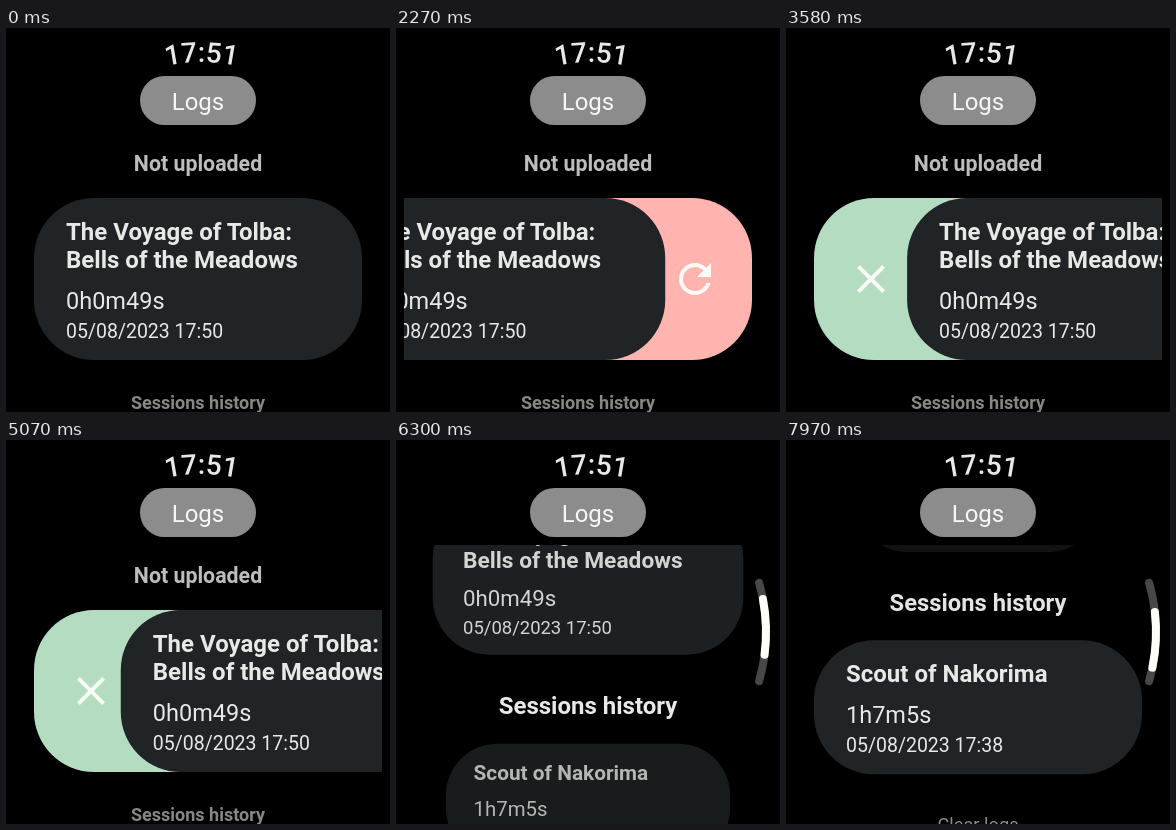
An HTML page that plays this animation: 384 by 384 pixels, repeating every 8 s.

```html
<!DOCTYPE html>
<html lang="en">
<head>
<meta charset="utf-8">
<title>Watch logs</title>
<style>
  html, body { margin: 0; width: 100%; height: 100%; overflow: hidden; background: #000; }
  svg { display: block; width: 100vw; height: 100vh; }
  text { font-family: Roboto, sans-serif; font-size: 24px; fill: #e8e8e6; }
  .bold { font-weight: 700; }
  .mid { text-anchor: middle; }
  .length { font-size: 23.5px; }
  .date { font-size: 19.5px; }
  .card { fill: #202426; }
  .icon { fill: #fafaf6; }
  .bar { fill: none; stroke-width: 8; stroke-linecap: round; }
</style>
</head>
<body>
<svg viewBox="0 0 384 384">
  <defs>
    <clipPath id="view"><rect x="8" y="105" width="368" height="279"/></clipPath>
    <path id="arc" d="M95.5 67.8A165 165 0 0 1 295.5 67.8"/>
  </defs>

  <g clip-path="url(#view)">
    <g id="pending"><text class="bold mid" y="41.5">Not uploaded</text></g>

    <g id="current">
      <rect id="reveal" x="-164" width="328" height="162" rx="60"/>
      <path id="retry" class="icon" transform="translate(83 57) scale(2)" d="M17.65 6.35C16.2 4.9 14.21 4 12 4c-4.42 0-7.99 3.58-7.99 8s3.57 8 7.99 8c3.73 0 6.84-2.55 7.73-6h-2.08c-.82 2.33-3.04 4-5.65 4-3.31 0-6-2.69-6-6s2.69-6 6-6c1.66 0 3.14.69 4.22 1.78L13 11h7V4z"/>
      <path id="close" class="icon" transform="translate(-131 57) scale(2)" d="M19 6.41L17.59 5 12 10.59 6.41 5 5 6.41 10.59 12 5 17.59 6.41 19 12 13.41 17.59 19 19 17.59 13.41 12z"/>
      <g id="swipe">
        <rect class="card" x="-164" width="328" height="162" rx="60"/>
        <text class="bold" x="-132" y="42">The Voyage of Tolba:</text>
        <text class="bold" x="-132" y="70">Bells of the Meadows</text>
        <text class="length" x="-132" y="111">0h0m49s</text>
        <text class="date" x="-132" y="140">05/08/2023 17:50</text>
      </g>
    </g>

    <g id="history"><text class="bold mid" y="41.5">Sessions history</text></g>

    <g id="past">
      <rect class="card" x="-164" width="328" height="134" rx="60"/>
      <text class="bold" x="-132" y="42">Scout of Nakorima</text>
      <text class="length" x="-132" y="83">1h7m5s</text>
      <text class="date" x="-132" y="112">05/08/2023 17:38</text>
    </g>

    <g id="clear"><text class="mid" y="68.5">Clear logs</text></g>
  </g>

  <text class="mid" style="font-size:28px;font-weight:500"><textPath href="#arc" startOffset="50%">17:51</textPath></text>
  <rect x="134" y="48" width="116" height="49" rx="24.5" fill="#8c8c8c"/>
  <text class="mid" x="192" y="82" style="fill:#f6f6f4">Logs</text>

  <g id="scrollbar">
    <path id="track" class="bar" stroke="#484848"/>
    <path id="thumb" class="bar" stroke="#fffefa"/>
  </g>
</svg>
<script>
const LOOP = 8000;
const TOP = 106, BOTTOM = 376, SPAN = BOTTOM - TOP;
const $ = id => document.getElementById(id);

// Unscaled list items; gap is the space before each one.
const ITEMS = [
  { id: 'pending', height: 66, gap: 0 },
  { id: 'current', height: 162, gap: 5 },
  { id: 'history', height: 66, gap: 18 },
  { id: 'past', height: 134, gap: 5 },
  { id: 'clear', height: 120, gap: 5 }
];
const ANCHOR = 2;

const clamp = k => Math.min(1, Math.max(0, k));
const smooth = k => k * k * (3 - 2 * k);
const easeOut = (t, from, to) => 1 - (1 - clamp((t - from) / (to - from))) ** 2;
const pulse = (t, out, back) => easeOut(t, out, out + 400) - easeOut(t, back, back + 365);

const swipeOffset = t => 100 * (pulse(t, 3286, 5046) - pulse(t, 486, 2246));

// Top edge of the history heading: a drag that runs out into a slow fling.
function headingTop(t) {
  const u = (Math.max(0, t - 5790) / 495) ** 2.434;
  return 350 - 226 * u / (1 + u);
}

// Items shrink and fade near the ends of the list; taller ones start earlier.
function focus(distance, height) {
  const zone = SPAN * (0.35 + 0.5 * clamp(height / SPAN - 0.2));
  return smooth(clamp(distance / zone));
}
const scaleOf = k => 0.7 + 0.3 * k;

function place({ id, height }, y, k) {
  $(id).setAttribute('transform', `translate(192 ${y}) scale(${scaleOf(k)})`);
  $(id).setAttribute('opacity', 0.5 + 0.5 * k);
  return height * scaleOf(k);
}

function layout(top) {
  let y = top;
  for (const item of ITEMS.slice(ANCHOR)) {
    if (item !== ITEMS[ANCHOR]) y += item.gap;
    const distance = Math.min(BOTTOM - y, y + item.height - TOP);
    y += place(item, y, focus(distance, item.height));
  }
  y = top;
  for (let i = ANCHOR - 1; i >= 0; i--) {
    const item = ITEMS[i];
    y -= ITEMS[i + 1].gap;
    const k = focus(y - TOP, item.height);
    y -= item.height * scaleOf(k);
    place(item, y, k);
  }
}

function edgeArc(halfAngle) {
  const r = 178, a = halfAngle * Math.PI / 180;
  const x = 192 + r * Math.cos(a), dy = r * Math.sin(a);
  return `M${x} ${192 - dy}A${r} ${r} 0 0 1 ${x} ${192 + dy}`;
}

function show(id, visible) {
  $(id).setAttribute('visibility', visible ? 'visible' : 'hidden');
}

function render(t) {
  const offset = swipeOffset(t), top = headingTop(t);
  $('swipe').setAttribute('transform', `translate(${offset} 0)`);
  $('reveal').setAttribute('fill', offset < 0 ? '#ffb4b0' : '#b4dcc0');
  show('reveal', offset !== 0);
  show('retry', offset < 0);
  show('close', offset > 0);

  layout(top);
  $('thumb').setAttribute('transform', `rotate(${(192 - top) * 0.0414} 192 192)`);
  $('scrollbar').setAttribute('opacity', clamp((t - 5970) / 250));
}

$('track').setAttribute('d', edgeArc(16));
$('thumb').setAttribute('d', edgeArc(9));

const start = performance.now();
function tick() {
  render((performance.now() - start) % LOOP);
  requestAnimationFrame(tick);
}
tick();
</script>
</body>
</html>
```
